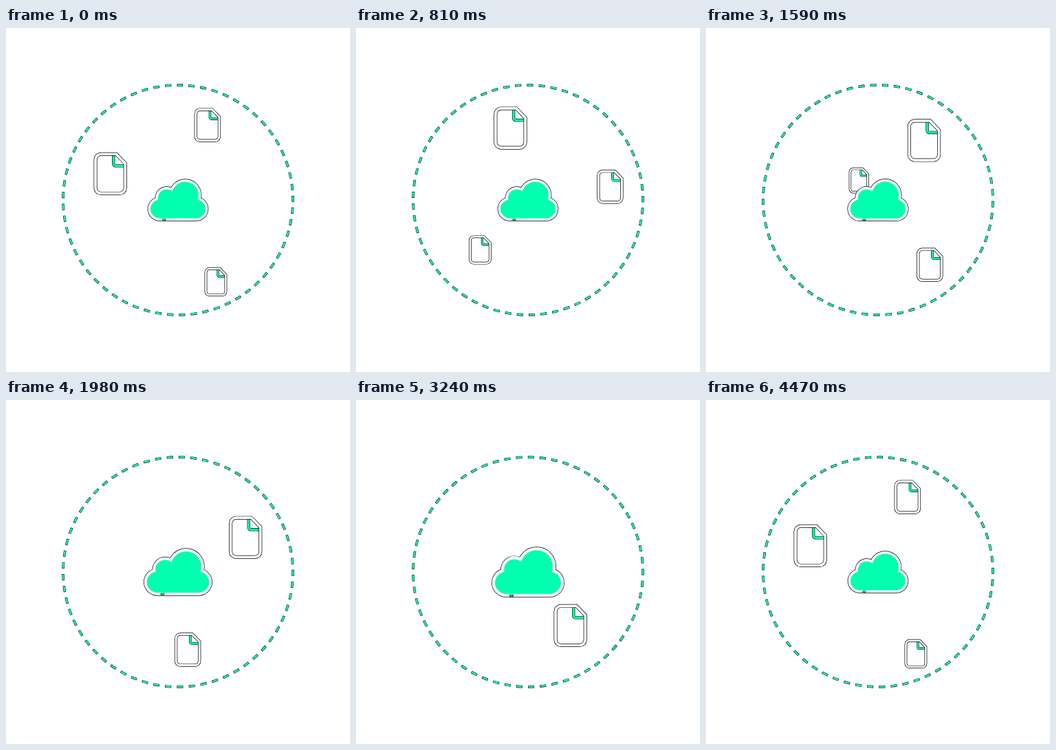
Recreate the animation shown at these times as an HTML page with a canvas. Size 500 by 500 pixels, loop 4.53 s.

```html
<!DOCTYPE html>
<html lang="en">
<head>
<meta charset="utf-8">
<title>Cloud sync</title>
<style>
  html, body { margin: 0; width: 100%; height: 100%; overflow: hidden; background: #fff; }
  canvas { display: block; width: 500px; height: 500px; }
</style>
</head>
<body>
<canvas id="stage" width="500" height="500"></canvas>
<script>
const ctx = document.getElementById('stage').getContext('2d');
const LOOP = 4530, LAST = 4470, TURN = 4500, STEP = 30, BURST = 4090;
const GREEN = '#00ffae', INK = '#000', PAPER = '#fff';
const DEG = Math.PI / 180;

// Orbits: degrees and ms for the angle, pixels for the radius.
// Each document falls into the cloud at `end`, and the cloud swells by `gain`.
const docs = [
  { size: 1, angle: 201.2, spin: 0.069, accel: -1.25e-6, radius: 105.5, drift: 0.0025,
    end: 4080, power: 9, gain: 0.07 },
  { size: 0.79, angle: 291.5, spin: 0.0711, accel: 2.7e-6, radius: 117, drift: 0.005,
    end: 3120, power: 5, gain: 0.07 },
  { size: 0.67, angle: 65.2, spin: 0.0679, accel: 2.08e-5, radius: 131, drift: -0.0375,
    end: 1740, power: 9, gain: 0.13 }
];

const smooth = v => {
  v = Math.max(0, Math.min(1, v));
  return v * v * (3 - 2 * v);
};

function stroke(path, color, width) {
  ctx.strokeStyle = color;
  ctx.lineWidth = width;
  ctx.stroke(path);
}

function centered(scale, paint) {
  ctx.save();
  ctx.translate(250, 250);
  ctx.scale(scale, scale);
  paint();
  ctx.restore();
}

function drawRing(t) {
  const r = 167, period = 2 * Math.PI * r / 61, dash = 9;
  const ring = new Path2D();
  ring.arc(0, 0, r, 0, 2 * Math.PI);
  const dashes = (length, color, width) => {
    ctx.setLineDash([length, period - length]);
    ctx.lineDashOffset = length / 2;
    stroke(ring, color, width);
  };
  centered(1, () => {
    ctx.rotate((-90 - 360 * t / TURN) * DEG + 2.5 / r);
    dashes(dash, INK, 3.6);
    dashes(dash - 1.2, GREEN, 2.6);
  });
}

const sheet = new Path2D('M-13.6-28.6H8.5L21.6-15V20.6a8 8 0 0 1-8 8H-13.6a8 8 0 0 1-8-8V-20.6a8 8 0 0 1 8-8Z');
const fold = new Path2D('M4.6-28V-14.5a3 3 0 0 0 3 3H20');

function drawDoc(doc, t) {
  const { size, angle, spin, accel, radius, drift, end, power } = doc;
  let a = angle, r, scale;
  if (t < end) {
    a += spin * t + accel * t * t;
    r = (radius + drift * t) * (1 - (t / end) ** power);
    scale = 1 - 0.7 * smooth((t - end + 200) / 200);
  } else if (t > BURST) {
    const out = 1 - (1 - (t - BURST) / (LAST - BURST)) ** 2;
    r = radius * out;
    scale = 0.3 + 0.7 * out;
  } else return;
  const s = size * scale, line = 1.4 / s;
  ctx.save();
  ctx.translate(250 + r * Math.cos(a * DEG), 250 + r * Math.sin(a * DEG));
  ctx.scale(s, s);
  ctx.fillStyle = PAPER;
  ctx.fill(sheet);
  stroke(fold, INK, 3.4 + line * 0.7);
  stroke(fold, GREEN, 3.2);
  stroke(sheet, INK, 3.7 + line);
  stroke(sheet, PAPER, 3.7);
  ctx.restore();
}

const lobes = [[-26.5, 13, 13.5], [-16.5, -3, 12.5], [10.5, -7, 19.5], [26.5, 13, 13.5]];

function fillCloud(grow, color) {
  ctx.beginPath();
  for (const [x, y, r] of lobes) {
    ctx.moveTo(x + r + grow, y);
    ctx.arc(x, y, r + grow, 0, 2 * Math.PI);
  }
  ctx.rect(-26.5, -1, 53, 27.5 + grow);
  ctx.fillStyle = color;
  ctx.fill();
}

function drawCloud(t) {
  const swell = docs.reduce((sum, d) => sum + d.gain * smooth((t - d.end + 180) / 240), 0);
  const s = 1 + swell * (1 - smooth((t - BURST) / (LAST - BURST)));
  centered(s, () => {
    fillCloud(3.6 + 0.7 / s, INK);
    fillCloud(3.6, PAPER);
    fillCloud(0, GREEN);
    // small tab in the lower outline
    ctx.fillStyle = INK;
    ctx.fillRect(-22.5, 27.4, 5, 2.2);
    ctx.fillStyle = GREEN;
    ctx.fillRect(-21.8, 26, 3.6, 2.8);
  });
}

function draw(now) {
  const raw = now % LOOP;
  // the closing step already shows the opening pose
  const t = raw < LAST ? raw - raw % STEP : 0;
  ctx.fillStyle = PAPER;
  ctx.fillRect(0, 0, 500, 500);
  drawRing(t);
  docs.forEach(d => drawDoc(d, t));
  drawCloud(t);
}

const origin = performance.now();
function tick() {
  draw(performance.now() - origin);
  requestAnimationFrame(tick);
}
tick();
</script>
</body>
</html>
```
